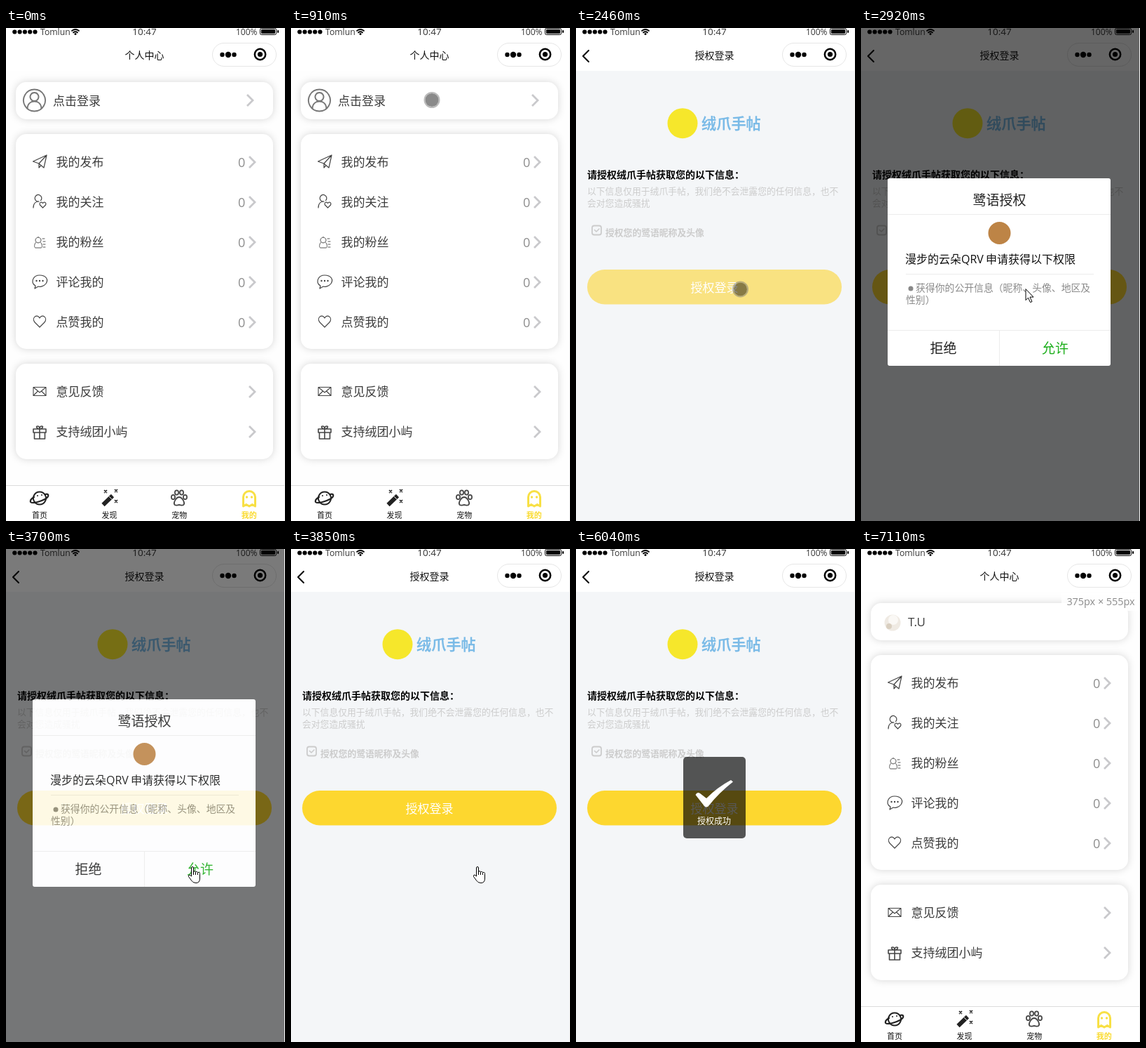
These frames come from a looping animation (398 by 702 pixels, 7.51 s). An HTML page:

```html
<!DOCTYPE html>
<html lang="zh-CN">
<head>
<meta charset="utf-8">
<title>个人中心</title>
<style>
html, body { margin: 0; width: 100%; height: 100%; overflow: hidden; background: #fff; }
svg { display: block; width: 100vw; height: 100vh; font-family: "Open Sans", "Noto Sans CJK SC", sans-serif; }
.card { fill: #fff; filter: drop-shadow(0 0 5.5px rgba(0, 0, 0, .16)); }
.line { fill: none; stroke: #444; stroke-width: 1.2; stroke-linejoin: round; stroke-linecap: round; }
.rule { stroke: #ececec; }
</style>
</head>
<body>
<svg id="stage" viewBox="0 0 398 702"></svg>
<script>
const LOOP = 7510;

const text = (x, y, size, fill, str, more = '') =>
  `<text x="${x}" y="${y}" font-size="${size}" fill="${fill}" ${more}>${str}</text>`;
const mid = (x, y, size, fill, str, more = '') =>
  text(x, y, size, fill, str, 'text-anchor="middle" ' + more);
const line = (d, style = '') => `<path class="line" d="${d}" style="${style}"/>`;
const dot = (x, y, r, fill = '#000') => `<circle cx="${x}" cy="${y}" r="${r}" fill="${fill}"/>`;
const rect = (x, y, w, h, rx, more) =>
  `<rect x="${x}" y="${y}" width="${w}" height="${h}" rx="${rx}" ${more}/>`;
const group = (id, body) => `<g id="${id}">${body}</g>`;
const chevron = (x, y) => line(`M${x} ${y - 8}l8 8-8 8`,
  'stroke:#c9c9cc;stroke-width:2.8;stroke-linecap:butt;stroke-linejoin:miter');

// Row icons are drawn around the point (48, row centre).
const icons = {
  plane: line('M-9.5-1L10-10 6 8-1 2ZM10-10L-1 2V8L2 4.5'),
  follow: line('M-9 8C-9 1-5-1-1-1A4.8 4.8 0 1 1 1.5-2.4M4.5 8L.5 4C-1 0 3-1 4.5 1.5 6-1 10 0 8.5 4Z'),
  fans: line('M-2-7A4 4 0 1 1-2.01-7ZM-5 0C-8 2-8 8-6 8H2C4 8 4 2 1 0M4-5H7M5-1H8M5 3H8M5 7H8', 'stroke-width:.9'),
  comment: line('M-6 5C-14 0-9-10 0-10S13-4 9 2C6 6 0 7-2 6L-7 9Z') +
    dot(-4.5, -2, 1.2, '#444') + dot(0, -2, 1.2, '#444') + dot(4.5, -2, 1.2, '#444'),
  heart: line('M0 7L-7 0C-12-6-4-13 0-6 4-13 12-6 7 0Z'),
  mail: line('M-9-6.5H9V5.5H-9ZM-9-6.5L0 1 9-6.5M-9 5.5L-2.5-1M9 5.5L2.5-1', 'stroke-width:1.1'),
  gift: line('M-9-4H9V1H-9ZM-7.5 1V10H7.5V1M0-4V10M0-4C-4-4-6-8-3-8S0-5 0-4C0-5 0-8 3-8S4-4 0-4', 'stroke-width:1.6'),
};
const rows = [
  [191, 'plane', '我的发布', 1], [248, 'follow', '我的关注', 1], [305, 'fans', '我的粉丝', 1],
  [362, 'comment', '评论我的', 1], [419, 'heart', '点赞我的', 1],
  [518, 'mail', '意见反馈', 0], [575, 'gift', '支持绒团小屿', 0],
];
const row = ([y, icon, label, count]) =>
  `<g transform="translate(48 ${y})">${icons[icon]}</g>` +
  text(71.5, y + 6, 17, '#3c3c3c', label) +
  (count ? text(331, y + 7, 18, '#8e8e8e', '0') : '') + chevron(347, y);

const card = (y, h) => rect(14, y, 367, h, 15, 'class="card"');
const guest = group('guest',
  line('M40.5 87.5a15.5 15.5 0 1 1-.01 0ZM40.5 92a6 6 0 1 1-.01 0ZM30.5 114.5C31 107 36 104.5 40.5 104.5S50 107 50.5 114.5',
    'stroke:#777;stroke-width:1.9') +
  text(67, 110, 17, '#3c3c3c', '点击登录') + chevron(344, 103));
const member = group('member',
  dot(45, 105, 11.5, '#efeae3') + dot(46, 101, 7, '#faf8f5') + dot(40, 110, 4, '#d9cfc0') +
  text(67, 110, 17, '#3c3c3c', 'T.U'));

const sparkle = (x, y) => line(`M${x - 1.5} ${y - 1.5}l3 3m0-3l-3 3`, 'stroke:#222;stroke-width:1.7');
const tabs = group('tabs',
  rect(0, 651, 398, 51, 0, 'fill="#fff"') + '<path d="M0 651.5H398" stroke="#dcdcdc"/>' +
  line('M48 660.5a9 9 0 1 1-.01 0Z', 'stroke:#222;stroke-width:2') +
  line('M40 668C34 671 33 676 38 676 45 676 58 671 60 667 61 664 59 663 56 664', 'stroke:#222;stroke-width:2.2') +
  dot(45, 666, 1, '#222') + dot(51, 665, 1, '#222') +
  line('M138.5 679L152 666', 'stroke:#222;stroke-width:6;stroke-linecap:butt') +
  line('M147.5 667.5l3 3', 'stroke:#fff;stroke-width:1') +
  sparkle(142, 660) + sparkle(157, 659) + sparkle(157, 674) +
  [[238.5, 668], [243.5, 661.5], [250.5, 661.5], [255.5, 668]].map(([x, y]) =>
    `<ellipse class="line" cx="${x}" cy="${y}" rx="2.6" ry="3.2" style="stroke-width:1.7"/>`).join('') +
  line('M247 668C243 668 239 675 240 678S245 679 247 679 253 681 254 678 251 668 247 668Z', 'stroke-width:1.8') +
  line('M338.5 681V668a8.5 8.5 0 0 1 17 0V681l-4.2-2.5-4.3 2.5-4.3-2.5Z', 'stroke:#f8e045;stroke-width:3') +
  dot(343.5, 668, 1.7, '#f8e045') + dot(350.5, 668, 1.7, '#f8e045') +
  ['首页', '发现', '宠物', '我的'].map((s, i) =>
    mid(48 + 99.6 * i, 697.5, 11, i == 3 ? '#fadb2e' : '#111', s, i == 3 ? 'font-weight="600"' : '')).join(''));

const home = group('home', rect(0, 61, 398, 641, 0, 'fill="#fefefe"') +
  card(77, 53) + card(151, 306) + card(478, 136) + guest + member + rows.map(row).join('') + tabs);

const auth = group('auth', rect(0, 61, 398, 641, 0, 'fill="#f4f6f8"') +
  dot(152, 135.7, 21.5, '#f6e72b') +
  text(179, 144, 21.2, '#7bbbe7', '绒爪手帖', 'font-weight="900"') +
  text(16, 214, 14, '#000', '请授权绒爪手帖获取您的以下信息：', 'font-weight="700"') +
  text(16, 237, 12.8, '#ccc', '以下信息仅用于绒爪手帖，我们绝不会泄露您的任何信息，也不') +
  text(16, 254, 12.8, '#ccc', '会对您造成骚扰') +
  rect(23, 281.5, 13, 13, 3, 'fill="none" stroke="#ccc" stroke-width="1.8"') +
  line('M26.5 287.5l2.5 2.5 4-4', 'stroke:#ccc;stroke-width:1.6') +
  text(42, 296, 12.8, '#ccc', '授权您的鹭语昵称及头像', 'font-weight="600"') +
  rect(16, 344, 363, 49.5, 24.75, 'id="button"') + mid(197.5, 376, 17, '#fff', '授权登录'));

const header = rect(0, 0, 398, 61, 0, 'fill="#fff"') +
  [0, 1, 2, 3, 4].map(i => dot(12.3 + 7.3 * i, 5.5, 3.1)).join('') +
  text(49, 9.5, 12.2, '#333', 'Tomlun') +
  line('M94 4Q99 0 104 4M96 6.5Q99 4 102 6.5', 'stroke:#000;stroke-width:1.7') + dot(99, 8.5, 1.5) +
  mid(197.5, 10, 13.5, '#333', '10:47') + text(328, 10, 12, '#333', '100%') +
  rect(362.5, .5, 23, 9, 2, 'fill="none" stroke="#000"') + rect(364, 2, 20, 6, 1, '') + rect(387, 3, 2, 4, 1, '') +
  group('back', line('M18 32L10 40 18 48', 'stroke:#000;stroke-width:2')) +
  mid(197.5, 44, 14, '#111', '', 'id="title"') +
  rect(294.5, 21.5, 91, 33, 16.5, 'fill="#fff" stroke="#e6e6e6"') +
  dot(308.5, 38, 3.2) + dot(317, 38, 4.2) + dot(325.5, 38, 3.2) +
  '<circle cx="362.5" cy="37.5" r="7.7" fill="none" stroke="#000" stroke-width="2.5"/>' + dot(362.5, 37.5, 3.6);

const label = group('label', rect(286, 62, 111, 26, 0, 'fill="#fff" opacity=".8"') +
  mid(342, 80, 14.4, '#8c8c8c', '', 'id="size"'));

const modal = group('modal', rect(0, 0, 398, 702, 0, 'opacity=".6"') +
  rect(38, 214, 318, 267, 3, 'fill="#fff"') +
  mid(197.5, 251.5, 19, '#222', '鹭语授权') + dot(197.5, 292, 16, '#bd8446') +
  text(63, 335, 16, '#111', '漫步的云朵QRV') + text(178, 335, 16, '#111', '申请获得以下权限') +
  dot(71, 371, 3.5, '#888') +
  text(78, 375, 13.85, '#8a8a8a', '获得你的公开信息（昵称、头像、地区及') + text(64, 392, 13.85, '#8a8a8a', '性别）') +
  '<path class="rule" d="M38 265.5H356M64 350.5H332M38 430.5H356M197.5 430V481"/>' +
  mid(117.5, 463, 19, '#222', '拒绝') + mid(277, 463, 19, '#1aad19', '允许'));

const toast = group('toast', rect(153, 296, 89, 116, 5, 'opacity=".66"') +
  '<path fill="#fff" d="M170.5 350Q173 345 177 348L186 355Q202 339 221 329L224 331.5Q204 347 189 366 186 369 183 366Z"/>' +
  mid(197, 391.5, 12, '#fff', '授权成功'));

const cursors = group('cursor',
  group('touch', '<circle r="9.5" opacity=".46"/><circle r="10.5" fill="none" stroke="#777" stroke-opacity=".5" stroke-width="2"/>') +
  group('arrow', '<path d="M.5 0V16L4 12.5 7 19 9.5 18 6.5 11.5H11.5Z" fill="#fff" stroke="#000"/>') +
  group('hand', '<path d="M-.5 14V2a1.5 1.5 0 0 1 3 0V8Q4-0.5 0 0 0" fill="none"/>' .replace(/.*/, '') +
    '<path d="M-.5 14V2a1.5 1.5 0 0 1 3 0V8a1.5 1.5 0 0 1 3 .5 1.5 1.5 0 0 1 3 1 1.5 1.5 0 0 1 3 1V17Q11.500 23.500 6 23.500 1.500 23.500-.5 20L-4.500 14.500Q-5 12-3 12Z" fill="#fff" stroke="#000" stroke-linejoin="round"/>' +
    '<path d="M2.5 8V12M5.5 8.5V12M8.5 9.5V12" stroke="#000"/>'));

stage.innerHTML = home + auth + header + label + toast + modal +
  '<path d="M397.5 0V702" stroke="#f0f0f0"/>' + cursors;

const $ = id => document.getElementById(id);
const show = (id, on) => $(id).setAttribute('opacity', +on);
const clamp = v => Math.max(0, Math.min(1, v));
const ramp = (t, a, b) => clamp((t - a) / (b - a));

// Pointer path: time, x, y
const path = [
  [70, 303, 520], [610, 215, 72], [760, 201, 102.5], [910, 201, 102.5], [990, 209, 90.5],
  [1910, 209, 90.5], [2380, 234.5, 372], [3160, 234.5, 371.5], [3550, 265, 452], [4020, 265, 452],
  [4100, 265, 449], [4400, 265, 449], [5090, 296, 521], [5180, 296, 521], [5870, 331, 690], [6040, 332, 690],
];
function pointer(t) {
  let i = path.findIndex(p => p[0] > t);
  if (i < 1) i = i < 0 ? path.length - 1 : 1;
  const [a, x, y] = path[i - 1], [b, u, v] = path[i];
  const p = ramp(t, a, b), e = p * p * (3 - 2 * p);
  return [x + (u - x) * e, y + (v - y) * e];
}

function draw(t) {
  const onAuth = t >= 1140 && t < 6880;
  const slide = 398 * (1 - ramp(t, 1300, 1776)) ** 2;
  $('title').textContent = onAuth ? '授权登录' : '个人中心';
  show('back', onAuth);
  show('tabs', !onAuth);
  show('auth', onAuth);
  $('auth').setAttribute('transform', `translate(${Math.round(slide)} 0)`);
  show('guest', t < 7110);
  show('member', t >= 7110);

  $('size').textContent = onAuth ? '375px × 603px' : '375px × 555px';
  show('label', t >= 6960 ? 1 : t >= 1220 ? 1 - ramp(t, 2000, 2200) : 0);
  $('button').setAttribute('fill', t >= 2400 && t < 2690 ? '#f9e281' : '#fdd72f');
  show('modal', t >= 2920 ? 1 - ramp(t, 3680, 3840) : 0);
  show('toast', t < 6880 ? ramp(t, 4390, 4480) : 0);

  $('cursor').setAttribute('transform', `translate(${pointer(t)})`);
  const asArrow = t >= 2920 && t < 3500, asHand = t >= 3500 && t < 4060;
  show('arrow', asArrow);
  show('hand', asHand);
  show('touch', t >= 70 && t < 6040 && !asArrow && !asHand);
}

const start = performance.now();
function tick() {
  draw((performance.now() - start) % LOOP);
  requestAnimationFrame(tick);
}
tick();
</script>
</body>
</html>
```
